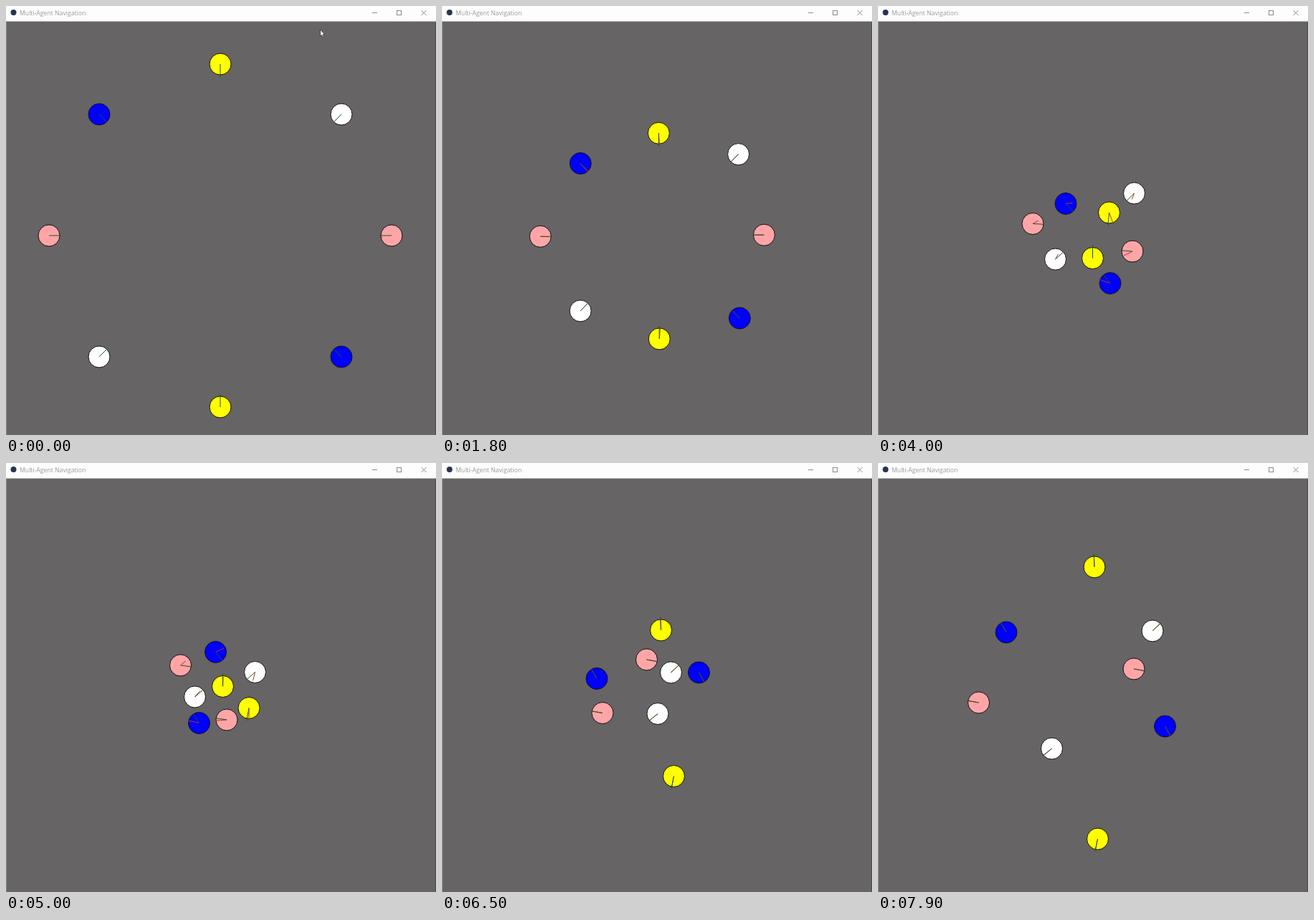
Write an HTML page with a canvas that moves like this. It is 600x598 px and loops after 8 s.

```html
<!DOCTYPE html>
<html lang="en">
<head>
<meta charset="utf-8">
<title>Multi-Agent Navigation</title>
<style>
html, body { margin: 0; width: 100%; height: 100%; overflow: hidden; background: #666465; }
canvas { display: block; }
</style>
</head>
<body>
<canvas id="stage" width="600" height="598"></canvas>
<script>
const ctx = document.getElementById('stage').getContext('2d');
const LOOP = 8000, STEP = 100;
const CENTER = [299, 320], RING = 239, RADIUS = 15;
const LOOK = 0.27; // seconds of travel shown by the velocity line

// Seconds at which each agent passes its waypoints; the first is its place on the ring.
const TIMES = [0, 1, 2.6, 4, 5, 6.5, 7.9];

// turn: place on the ring in eighths, mid: velocities (px/s) while dodging at 4 s and 5 s
const agents = [
  { turn: 0, color: '#ffa5a8', reach: 16, mid: [[-45, 22], [-56, 4]],
    path: [[490.5, 320], [410, 321.5], [355, 342], [308, 358], [224, 348.5], [140.5, 334]] },
  { turn: 1, color: '#0000ff', reach: 15, mid: [[-52, -18], [-54, -12]],
    path: [[439.5, 460], [387.5, 412.5], [324, 386.5], [269.5, 362.5], [216, 300.5], [179, 236]] },
  { turn: 2, color: '#ffff00', reach: 18, mid: [[0, -42], [2, -50]],
    path: [[300, 510.5], [305.5, 417.5], [299.5, 351.5], [302.5, 311.5], [305.5, 233], [302, 145]] },
  { turn: 3, color: '#ffffff', reach: 15, mid: [[15, -27], [28, -32]],
    path: [[163, 456], [220.5, 394.5], [247.5, 353], [263.5, 326], [319.5, 292], [383, 234]] },
  { turn: 4, color: '#ffa5a8', reach: 16, mid: [[28, -16], [26, -22]],
    path: [[102, 320], [170.5, 320], [216, 303.5], [243.5, 282], [285.5, 274], [357, 287]] },
  { turn: 5, color: '#0000ff', reach: 15, mid: [[36, -4], [44, -20]],
    path: [[163.5, 185.5], [222, 250], [262, 275.5], [292.5, 263.5], [358.5, 292], [400.5, 367]] },
  { turn: 6, color: '#ffff00', reach: 18, mid: [[18, 48], [0, 60]],
    path: [[300, 130.5], [307, 223.5], [322.5, 288], [339, 341.5], [323.5, 436.5], [306.5, 524]] },
  { turn: 7, color: '#ffffff', reach: 15, mid: [[-12, 32], [-11, 44]],
    path: [[439, 181], [389.5, 230.5], [357.5, 261], [347.5, 291.5], [301, 349.5], [242.5, 398]] }
];

function ringPoint(turn) {
  const a = turn * Math.PI / 4;
  return [CENTER[0] + RING * Math.cos(a), CENTER[1] + RING * Math.sin(a)];
}

function prepare(agent) {
  const pts = [ringPoint(agent.turn), ...agent.path];
  const gap = i => TIMES[i + 1] - TIMES[i];
  const slope = i => pts[i].map((p, k) => (pts[i + 1][k] - p) / gap(i));
  const blend = i => slope(i).map((s, k) =>
    (slope(i - 1)[k] * gap(i) + s * gap(i - 1)) / (gap(i) + gap(i - 1)));
  const v1 = blend(1);
  const v0 = slope(0).map((s, k) => 2 * s - v1[k]);
  agent.pts = pts;
  agent.vel = [v0, v1, blend(2), ...agent.mid, slope(5), slope(5)];
  agent.goal = ringPoint(agent.turn + 4);
}
agents.forEach(prepare);

// Cubic Hermite position and velocity
function poseAt({ pts, vel }, t) {
  let i = 0;
  while (i < TIMES.length - 2 && t >= TIMES[i + 1]) i++;
  const h = TIMES[i + 1] - TIMES[i], u = (t - TIMES[i]) / h;
  const pos = [], speed = [];
  for (const k of [0, 1]) {
    const p = pts[i][k], d = pts[i + 1][k] - p;
    const a = vel[i][k] * h, b = vel[i + 1][k] * h;
    const c2 = 3 * d - 2 * a - b, c3 = a + b - 2 * d;
    pos.push(p + u * (a + u * (c2 + u * c3)));
    speed.push((a + u * (2 * c2 + 3 * u * c3)) / h);
  }
  return { pos, speed };
}

function line(x, y, dx, dy, color) {
  ctx.strokeStyle = color;
  ctx.beginPath();
  ctx.moveTo(x, y);
  ctx.lineTo(x + dx, y + dy);
  ctx.stroke();
}

function disc(x, y, r, color) {
  ctx.fillStyle = color;
  ctx.beginPath();
  ctx.arc(x, y, r, 0, 2 * Math.PI);
  ctx.fill();
}

function drawAgent(agent, t) {
  const { pos: [x, y], speed: [vx, vy] } = poseAt(agent, t);
  disc(x, y, RADIUS, agent.color);
  ctx.strokeStyle = '#111';
  ctx.stroke();
  if (t > 0) line(x, y, vx * LOOK, vy * LOOK, '#b8302c');
  const dx = agent.goal[0] - x, dy = agent.goal[1] - y;
  const k = agent.reach / Math.hypot(dx, dy);
  line(x, y, dx * k, dy * k, '#1c561c');
}

function drawTitleBar() {
  ctx.fillStyle = '#fefdfe';
  ctx.fillRect(0, 0, 600, 21.5);
  disc(10.5, 9, 4, '#27344f');
  ctx.fillStyle = '#999';
  ctx.font = '8.67px "Open Sans", "Noto Sans", sans-serif';
  ctx.fillText('Multi-Agent Navigation', 19, 13);
  const ink = '#8c8c8c';
  line(511, 9.5, 7, 0, ink);
  ctx.strokeRect(545.5, 6.5, 6, 6);
  line(579.5, 6, 7, 7, ink);
  line(586.5, 6, -7, 7, ink);
}

function drawCursor(t) {
  if (t >= 0.3) return;
  ctx.save();
  ctx.translate(438.5, 33 - 80 * t);
  ctx.beginPath();
  [[0, 0], [0, 9], [2, 7.2], [3.6, 10.6], [5, 10], [3.6, 6.8], [6, 6.4]]
    .forEach(p => ctx.lineTo(...p));
  ctx.closePath();
  ctx.fillStyle = '#fff';
  ctx.strokeStyle = '#222';
  ctx.lineWidth = 0.7;
  ctx.fill();
  ctx.stroke();
  ctx.restore();
}

function draw(t) {
  ctx.lineWidth = 1;
  ctx.fillStyle = '#666465';
  ctx.fillRect(0, 0, 600, 598);
  line(0.5, 22, 0, 576, '#8a888a');
  line(599.5, 22, 0, 576, '#4a494a');
  drawTitleBar();
  agents.forEach(agent => drawAgent(agent, t));
  drawCursor(t);
}

const start = performance.now();
function tick() {
  const ms = (performance.now() - start) % LOOP;
  draw(Math.floor(ms / STEP) * STEP / 1000);
  requestAnimationFrame(tick);
}
tick();
</script>
</body>
</html>
```
